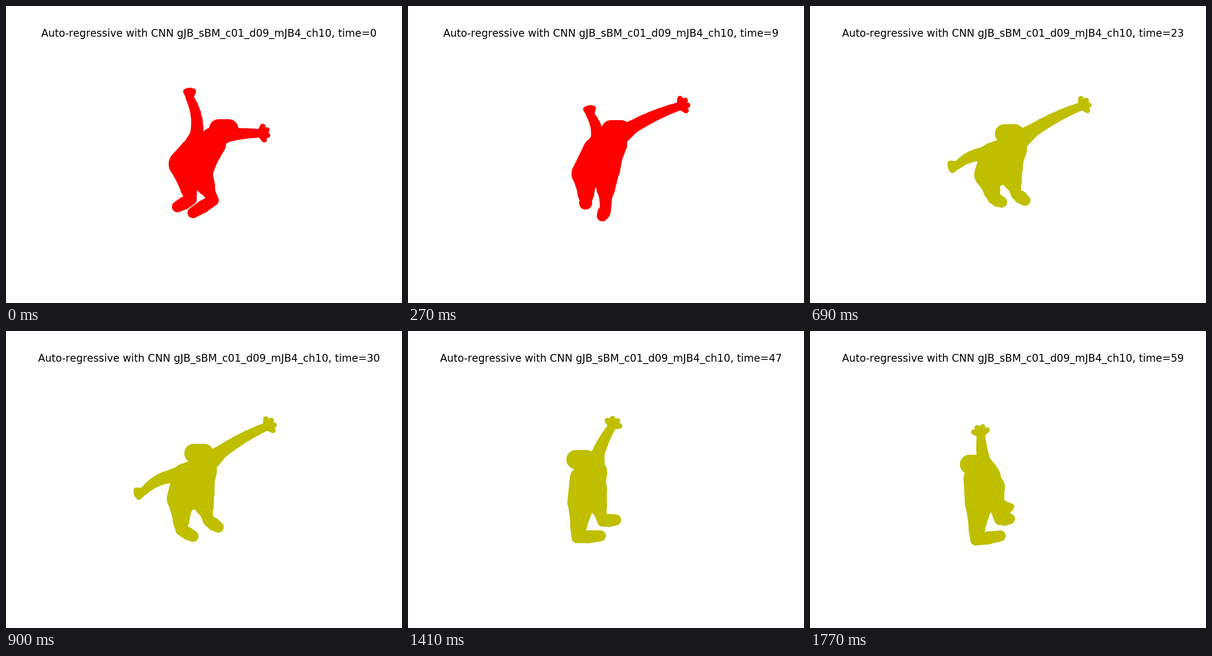
A matplotlib script for the animation above (1800 ms loop, 864 by 648 pixels).

```python
import numpy as np
import matplotlib.pyplot as plt
from matplotlib.animation import FuncAnimation
from matplotlib.patches import PathPatch
from matplotlib.path import Path

W, H, DPI = 864, 648, 135
FRAMES, STEP_MS = 60, 30
KEYS = np.array([0, 9, 17, 30, 44, 59])  # times of the key poses
TITLE = "Auto-regressive with CNN gJB_sBM_c01_d09_mJB4_ch10, time={}"


def glide(*points):
    """Smooth path through the key points, without overshoot, for all times."""
    p, gap = np.array(points, float), np.diff(KEYS)[:, None]
    d = np.diff(p, axis=0) / gap
    same = d[:-1] * d[1:] > 0
    mean = 2 * d[:-1] * d[1:] / np.where(same, d[:-1] + d[1:], 1)
    m = np.vstack([d[:1], np.where(same, mean, 0), d[-1:]])
    t = np.arange(FRAMES)
    k = np.searchsorted(KEYS[1:-1], t, side="right")
    h = gap[k]
    s = (t - KEYS[k])[:, None] / h
    ease = s * s * (3 - 2 * s)
    return (p[k] + ease * (p[k + 1] - p[k])
            + s * (1 - s) * h * ((1 - s) * m[k] - s * m[k + 1]))


def mix(a, b, s):
    return a + (b - a) * s


def turn(v, degrees):
    c, s = np.cos(np.radians(degrees)), np.sin(np.radians(degrees))
    return v @ np.array([[c, s], [-s, c]])


def limb(points, radii):
    """Bones between round joints that follow one another."""
    joints = list(zip(points, radii))
    return list(zip(joints[:-1], joints[1:]))


def arm(root, palm, bend, spread):
    """Tapering, slightly bowed arm that ends in four spread fingers."""
    reach = palm - root
    bow = turn(reach, 90) * bend
    along = np.linspace(0.3, 1, 6)
    points = [root + reach * s + bow * 4 * s * (1 - s) for s in along]
    bones = limb([root, *points], [25, *(17 - 8 * along)])
    finger = 16 * reach / np.linalg.norm(reach, axis=1, keepdims=True)
    for angle in np.linspace(-spread, spread, 4):
        bones += limb([palm, palm + turn(finger, angle)], [8, 6])
    return bones


def leg(hip, heel, toe, shin):
    points = [hip, mix(hip, heel, 0.5), mix(hip, heel, 0.7),
              heel, mix(heel, toe, 0.5), toe]
    return limb(points, [30, 20, shin, 12, 14, 12])


head = glide((475, 268), (454, 270), (445, 288), (421, 267), (383, 278), (359, 291))
chest = glide((450, 300), (448, 301), (450, 318), (430, 305), (409, 307), (386, 319))
back = glide((405, 318), (409, 314), (405, 332), (390, 316), (383, 322), (362, 322))
hip_l = glide((386, 345), (388, 366), (395, 369), (382, 366), (380, 372), (369, 376))
hip_r = glide((420, 361), (432, 355), (437, 355), (424, 353), (406, 348), (394, 341))
palm_l = glide((401, 200), (398, 238), (354, 344), (300, 350), (370, 386), (424, 379))
palm_r = glide((555, 278), (594, 218), (601, 226), (569, 208), (465, 206), (373, 225))
heel_l = glide((404, 422), (388, 428), (411, 412), (382, 434), (371, 449), (362, 456))
toe_l = glide((374, 438), (387, 432), (426, 412), (408, 448), (420, 447), (415, 447))
heel_r = glide((452, 424), (431, 443), (455, 408), (442, 414), (428, 415), (414, 411))
toe_r = glide((408, 451), (424, 458), (472, 421), (463, 428), (456, 413), (435, 410))

neck = chest - (0, 10)
brow = np.array([11, 0])

BONES = (limb([head - brow, head + brow], [21, 21])
         + limb([chest, mix(chest, hip_r, 0.5), hip_r, hip_l, back, chest],
                [30, 28, 31, 31, 27, 30])
         + arm(back, palm_l, bend=0.12, spread=30)
         + arm(neck, palm_r, bend=-0.04, spread=65)
         + leg(hip_l, heel_l, toe_l, shin=18)
         + leg(hip_r, heel_r, toe_r, shin=14))


def capsule(a, b, t):
    """Outline around two circles, always turning the same way."""
    (p, r), (q, s) = a, b
    dx, dy = q[t] - p[t]
    phi = np.arctan2(dy, dx)
    beta = np.arccos(np.clip((r - s) / max(np.hypot(dx, dy), 1e-6), -1, 1))

    def arc(centre, radius, start, end):
        u = np.linspace(start, end, 24)
        return centre + radius * np.column_stack([np.cos(u), np.sin(u)])

    pts = np.vstack([arc(q[t], s, phi - beta, phi + beta),
                     arc(p[t], r, phi + beta, phi + 2 * np.pi - beta)])
    return Path(np.vstack([pts, pts[:1]]), closed=True)


def body(t):
    return Path.make_compound_path(*(capsule(a, b, t) for a, b in BONES))


def shade(t):
    return "r" if t < 10 else "b" if t < 20 else "y"


plt.rcParams["text.kerning_factor"] = 6
fig = plt.figure(figsize=(W / DPI, H / DPI), dpi=DPI, facecolor="white")
ax = fig.add_axes([0, 0, 1, 1])
ax.set(xlim=(0, W), ylim=(H, 0))
ax.axis("off")

title = ax.text(442.8, 67, "", fontsize=12, family="DejaVu Sans",
                ha="center", va="baseline")
dancer = ax.add_patch(PathPatch(body(0), lw=0))


def draw(t):
    dancer.set_path(body(t))
    dancer.set_facecolor(shade(t))
    title.set_text(TITLE.format(t))
    return dancer, title


anim = FuncAnimation(fig, draw, frames=FRAMES, interval=STEP_MS,
                     repeat=True, repeat_delay=0)
plt.show()
```
